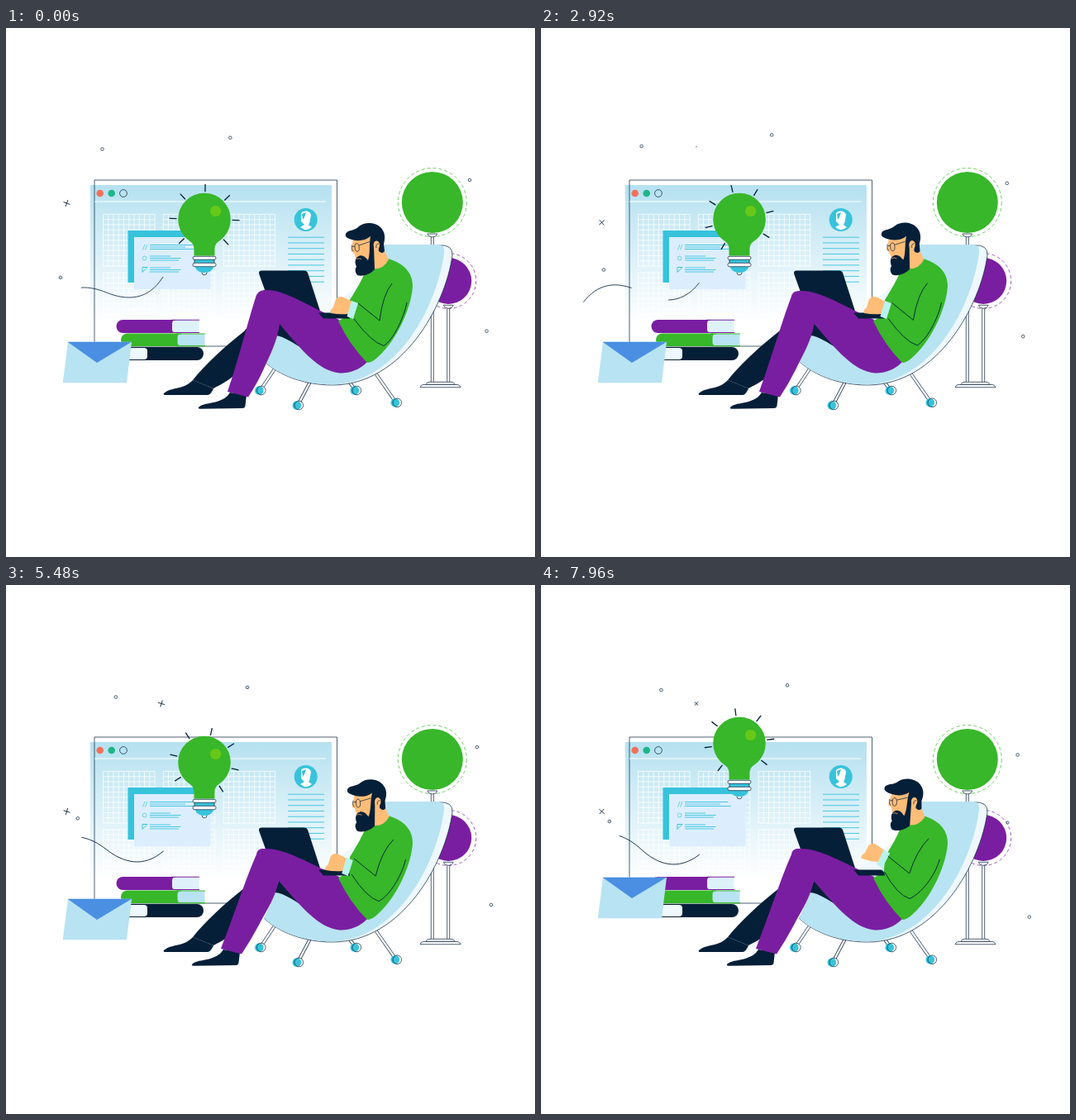
An HTML page with a canvas for the animation above (8 s loop, 640 by 640 pixels).

```html
<!DOCTYPE html>
<html lang="en">
<head>
<meta charset="utf-8">
<title>Working from a chair</title>
<style>
html, body { margin: 0; width: 100%; height: 100%; overflow: hidden; background: #fff; }
canvas { display: block; width: 100vw; height: 100vh; }
</style>
</head>
<body>
<canvas id="stage"></canvas>
<script>
const NAVY = '#051f38', GREEN = '#37b729', PURPLE = '#7a1ea1', CYAN = '#37c3dc';
const SKY = '#b8e3f2', PALE = '#eef8fe', CARD = '#dceefe', SKIN = '#ffbd78', WHITE = '#fff';
const LOOP = 8, STEP = 0.112, LEAD = 0.016; // seconds

const canvas = document.getElementById('stage');
const ctx = canvas.getContext('2d');
const ratio = window.devicePixelRatio || 1;
canvas.width = canvas.height = 640 * ratio;

// ---------- drawing helpers ----------
function fill(d, color) {
  ctx.fillStyle = color;
  ctx.fill(new Path2D(d));
}
function line(d, color = NAVY, width = 0.7) {
  ctx.strokeStyle = color;
  ctx.lineWidth = width;
  ctx.stroke(new Path2D(d));
}
function both(d, color) {
  fill(d, color);
  line(d);
}
function box(x, y, w, h, color) {
  ctx.fillStyle = color;
  ctx.fillRect(x, y, w, h);
}
function paint(color, outline) {
  if (color) { ctx.fillStyle = color; ctx.fill(); }
  if (outline) { ctx.strokeStyle = outline; ctx.lineWidth = 0.7; ctx.stroke(); }
}
function pill(x, y, w, h, radii, color, outline) {
  ctx.beginPath();
  ctx.roundRect(x, y, w, h, radii);
  paint(color, outline);
}
function disc(x, y, r, color, outline) {
  ctx.beginPath();
  ctx.arc(x, y, r, 0, Math.PI * 2);
  paint(color, outline);
}
function group(draw) {
  ctx.save();
  draw();
  ctx.restore();
}
function spin(x, y, deg) {
  ctx.translate(x, y);
  ctx.rotate(deg * Math.PI / 180);
}

// ---------- motion ----------
const phase = (t, from, to) => Math.min(1, Math.max(0, (t - from) / (to - from)));
const swing = (t, half) => (1 - Math.cos(Math.PI * t / half)) / 2;
const ease = (t, from, to) => swing(phase(t, from, to), 1);

// ---------- browser window ----------
function grid(x, y, rows) {
  const cell = 6.25;
  for (let k = 0; k <= rows; k++) line(`M${x} ${y + k * cell}h${10 * cell}`, WHITE, 1);
  for (let k = 0; k <= 10; k++) line(`M${x + k * cell} ${y}v${rows * cell}`, WHITE, 1);
}

function textRows(y, gap, width) {
  line(`M174 ${y}h${width}M174 ${y + gap}h${width * 1.5}M174 ${y + 2 * gap}h${width * 1.4}`, CYAN, 0.9);
}

function browser() {
  const g = ctx.createLinearGradient(0, 190, 0, 385);
  g.addColorStop(0, '#b5e1f0');
  g.addColorStop(0.85, '#ffffff');
  box(102, 190, 292, 195, g);
  line('M107 184H400.5V385H107Z');
  disc(113.7, 200, 4.3, '#f2705b');
  disc(127.7, 200, 4.3, '#1fb58a');
  disc(142, 200, 4.4, null, NAVY);
  line('M107 210H387', WHITE, 1);

  group(() => {
    ctx.globalAlpha = 0.75;
    for (let k = 0; k < 3; k++) {
      grid(117.5 + k * 72.8, 225.5, 10);
      grid(117.5 + k * 72.8, 296, 8);
    }
  });

  box(147.5, 245, 92, 63, CYAN);
  box(155, 253, 92.5, 63, CARD);
  line('M165.5 268.5L168 262M168.5 268.5L171 262', CYAN);
  disc(167.6, 278.5, 2.4, null, CYAN);
  line('M165 289.5H171L165 295.5Z', CYAN, 1);
  line('M174 262.5H226M174 265H217M174 267.5H230', CYAN, 0.9);
  textRows(276, 2.5, 25);
  textRows(290, 2.5, 25);

  disc(362.7, 232, 14, CYAN);
  fill('M357 224C360 220 368 221 369 226L367.5 235L366 238L370 241Q366 245 361 244L356 241L361 238L357 234Z', WHITE);
  fill('M358 225L363 223L361 229L359 232Z', CYAN);
  for (let k = 0; k < 9; k++) line(`M341 ${253.2 + k * 6.75}H385`, CYAN, 0.9);
}

function books() {
  pill(133.5, 353, 72, 16, [8, 0, 0, 8], PURPLE);
  pill(201, 353.5, 32.5, 15, [4, 0, 0, 4], '#def2f9');
  line('M200 353.3H234M200 368.5H234', PURPLE, 1.1);
  pill(139, 369.5, 73, 15.5, [8, 0, 0, 8], GREEN);
  pill(207.5, 370.3, 33, 14, [4, 0, 0, 4], SKY);
  line('M206 370H241M206 384.6H241', GREEN, 1.1);
  pill(164, 386, 75, 16, [0, 8, 8, 0], NAVY);
  pill(146, 387, 25, 14, [0, 4, 4, 0], PALE);
  line('M146 386.5H172M146 401.5H172', NAVY, 1.1);
}

// Sinks a little, then snaps upwards
function envelope(t) {
  const u = phase(t, 6.8, 7.95);
  group(() => {
    ctx.translate(0, 3 * Math.sin(Math.PI * u) - 26 * u ** 24);
    fill('M75 379.8H152L146 429.3H68.7Z', SKY);
    fill('M74.5 379.8H152L110 405Z', '#4a8fe2');
  });
}

// ---------- drifting line ----------
const WAVE = 'M-69 20C-51 -9 -25 -9 -0.5 1C24 11 50 11 68 -18';
const probe = document.createElementNS('http://www.w3.org/2000/svg', 'path');
probe.setAttribute('d', WAVE);
const waveLength = probe.getTotalLength();

// The dash gap travels once along the curve
function wave(t) {
  group(() => {
    spin(122, 319, 20.5 * swing(t, 8));
    ctx.setLineDash([0.7 * waveLength, 0.3 * waveLength]);
    ctx.lineDashOffset = -waveLength * (0.3 + ease(t, 0.5, 5.9));
    line(WAVE, NAVY, 0.8);
  });
}

// ---------- light bulb ----------
function bulb(t) {
  group(() => {
    ctx.translate(240, 231.5 - 40 * ease(t, 3.5, 7.9));
    for (let k = 0; k < 8; k++) {
      group(() => {
        spin(0, 0, 1.5 + t * 10.24 + k * 45);
        line('M0 -33.5V-42.5', NAVY, 1.3);
      });
    }
    disc(0, 0, 31.8, GREEN);
    fill('M-25 18C-17 27 -12.5 29 -12.5 36V44H12.5V36C12.5 29 17 27 25 18Z', GREEN);
    disc(13.6, -10, 6.6, '#68c817');
    disc(0, 64.3, 3, WHITE, NAVY);
    fill('M-11 57H11C11 61 6 64.5 0 64.5S-11 61 -11 57Z', CYAN);
    box(-12, 48, 24, 5, CYAN);
    line('M-12 48V53M12 48V53');
    pill(-14, 44.8, 28, 4, 2, WHITE, NAVY);
    pill(-14, 52.8, 28, 4.4, 2, WHITE, NAVY);
  });
}

// ---------- lamps and chair ----------
function lamp(x, y, r, ring, color, cup) {
  disc(x, y, r, color);
  group(() => {
    ctx.setLineDash([4, 3]);
    disc(x, y, ring, null, color);
  });
  box(x - 1.5, cup + 4, 3, 424 - cup, WHITE);
  line(`M${x - 1.5} ${cup + 4}V428M${x + 1.5} ${cup + 4}V428`);
  both(`M${x - 6} ${cup}H${x + 6}Q${x + 5} ${cup + 4} ${x} ${cup + 4}T${x - 6} ${cup}Z`, WHITE);
}

function lamps() {
  lamp(535.2, 306, 28, 33.5, PURPLE, 335.3);
  lamp(515.8, 211, 37, 41.5, GREEN, 249);
  both('M508 431.5Q509 428.3 512 428.3H539Q542 428.3 543 431.5Z', WHITE);
  both('M501 434.7Q502 431.5 505 431.5H546Q549 431.5 550 434.7Z', WHITE);
}

function chairLeg(x, y, u, v) {
  line(`M${x} ${y}L${u} ${v}`, NAVY, 3.8);
  line(`M${x} ${y}L${u} ${v}`, WHITE, 2.5);
  disc(u + 1.3, v, 5.3, WHITE);
  disc(u - 1.2, v, 5.3, CYAN);
  disc(u + 1.3, v, 5.3, null, NAVY);
}

function chair() {
  chairLeg(326, 411, 307.5, 438.5);
  chairLeg(368, 428, 353, 456.5);
  chairLeg(416, 429, 423, 438.5);
  chairLeg(448, 419, 472, 453.3);
  const shell = 'M524 262.8Q541 262 540 275C532 335 480 432 395 432C360 432 330 420 312 403';
  fill(shell + 'L440 300Z', PALE);
  line(shell);
  fill('M458 262H524Q531 263 530 272C522 335 475 428 395 431.5C360 431 330 420 312 403L328 368L345 360L400 365L440 300Z', SKY);
}

// ---------- man ----------
function legs(slide) {
  fill('M331 355L325 372C336 372 352 384 372 396L382 396Z', NAVY);
  fill('M300 353L288 367C265 385 240 408 226 426L251 436C262 430 275 425 290 405L312 350Z', NAVY);
  fill('M191 442C200 434 215 438 226 426L251 436C250 439 247 444 244 444H191.5Q190 443 191 442Z', NAVY);
  fill('M309 293.5H361Q364 293.5 365 296L381.5 347L325 350L306.3 298Q305 293.8 309 293.5Z', NAVY);

  const d = -8 * slide;
  group(() => {
    ctx.translate(d, 0);
    fill('M233 459C240 452 256 456 268 445L271 441L291 444L289.5 457Q289 460 286 460L235 460.8Q232 460.5 233 459Z', NAVY);
  });
  const top = 317 + 2 * slide;
  fill(`M${302 + slide} 326C304 319 308 ${top} 315 ${top}C338 ${top} 365 336 403 353L437 404
    C428 414 414 418 404 417.5C378 415 358 390 ${331 - slide} 358
    C${328 + d * 0.3} 380 ${319 + d * 0.7} 396 ${312 + d * 0.8} 412Q${304 + d} 430 ${293 + d} 446.5L${268 + d} 440
    C${280.5 + d * 0.8} 404 ${293 + d * 0.3} 354 ${302 + slide} 326Z`, PURPLE);
}

function torso() {
  fill('M439 287L462 279C480 284 492 295 492 312C491 335 475 375 451 397Q443 405 437 405Q416 384 402 354.5L415 347L416 329C424 316 432 303 435 293Z', GREEN);
  fill('M378 344.5H411Q415 345 416 351.5H384Z', NAVY);
}

function arm(reach, lift) {
  group(() => {
    spin(418 - 6.4 * reach + 1.5 * lift, 340 - 10 * lift, 10 * lift);
    ctx.translate(-418, -340);
    fill('M393 345Q391 342 396 338L399 328Q403 323 409 326L419 331L414 346Q403 347 393 345Z', SKIN);
    fill('M418 330L426 333L420 352L412.5 349Z', '#b9f2ee');
  });
  const a = -5 * reach - 1.3 * lift, b = -2 * reach - 3 * lift, c = -6 * reach - 5 * lift;
  line(`M${467 - a * 0.35} ${309 + b * 0.5}Q${456 + a * 0.3} 322 ${452 + a} ${354 + b}L${426 + a} ${333 + b}`, NAVY, 0.9);
  line(`M${485 + c * 0.25} 332C${481 + c * 0.4} 352 ${468 + c * 0.7} ${378 + b} ${457 + c} ${384.5 + b}
    Q${442 + c} ${380 + b} ${421 + c * 0.5} ${352 + b}`, NAVY, 0.9);
}

function head(tilt) {
  group(() => {
    spin(455 + tilt * 0.15, 285, tilt);
    ctx.translate(-455, -285);
    fill('M421 249L419 261L417.5 270L421 272L424 280L440 291Q456 294 463 280L457 268V250Z', SKIN);
    fill(`M411 249C413 244 421 246 427 240C434 234 447 235 453 241C459 247 459 254 457 261L458 270
      C456 273 453 272 451 270L450 258C446 256 444 260 445 265L446 292C440 299 430 301 425 299
      C422 295 422 291 424 289C421 282 423 277 428 275.5C433 274.5 436 279 438 281C441 273 439 262 441 252
      C433 259 421 258 413 254Q410 252 411 249Z`, NAVY);
    fill('M445 264C444 256 452 256 452 262C452 267 449 270 446 270Z', SKIN);
    line('M448 266Q447 261 451 261');
    line('M424 279.5Q427 278 430 279.5', SKIN);
    ctx.beginPath();
    ctx.ellipse(424.7, 265.5, 2.6, 4.9, -0.1, 0, Math.PI * 2);
    paint(null, NAVY);
    line('M420.5 270Q417.5 269 418.5 262.5M419 264.5L422 264M427 263L440 258.5');
  });
}

function man(t) {
  const slide = ease(t, 0.8, 5), reach = ease(t, 1, 6), lift = ease(t, 6.9, 8);
  legs(slide);
  torso();
  arm(reach, lift);
  head(2.7 * slide + 3.3 * lift);
}

// ---------- floating marks ----------
function cross(x, y, size, deg) {
  group(() => {
    spin(x, y, deg);
    line(`M${-size} 0H${size}M0 ${-size}V${size}`, NAVY, 0.8);
  });
}

function marks(t) {
  const ring = (x, y, dx, dy, half) => {
    const s = swing(t, half);
    disc(x + dx * s, y + dy * s, 1.8, WHITE, NAVY);
  };
  ring(116.5, 146.5, 43, -29, 13);
  ring(271.3, 132.7, 26.7, -11.4, 8);
  ring(66, 301.8, 21.3, -20, 6.1);
  ring(561, 184, 23.3, 32, 13);
  ring(581.5, 366.6, 12.4, 47, 12);

  const wobble = 33 + 17 * Math.sin(2 * Math.PI * (t - 0.9) / 6.5);
  cross(73.5, 212 + 62 * ease(t, 1.4, 5), 4.2, wobble);
  cross(188, 143.5, 4.2 * ease(t, 2.5, 4.4) - 1.2 * ease(t, 6.2, 8), wobble);
  const r = 1.6 * ease(t, 5.5, 6.8);
  if (r > 0) disc(564.5, 287.5, r, null, NAVY);
}

function draw(seconds) {
  const t = Math.floor((seconds % LOOP + LEAD) / STEP) * STEP;
  ctx.setTransform(ratio, 0, 0, ratio, 0, 0);
  box(0, 0, 640, 640, WHITE);
  ctx.lineJoin = 'round';
  for (const part of [browser, wave, bulb, books, envelope, lamps, chair, man, marks]) part(t);
}

let begin;
function tick(now) {
  begin ??= now;
  draw((now - begin) / 1000);
  requestAnimationFrame(tick);
}
draw(0);
requestAnimationFrame(tick);
</script>
</body>
</html>
```
